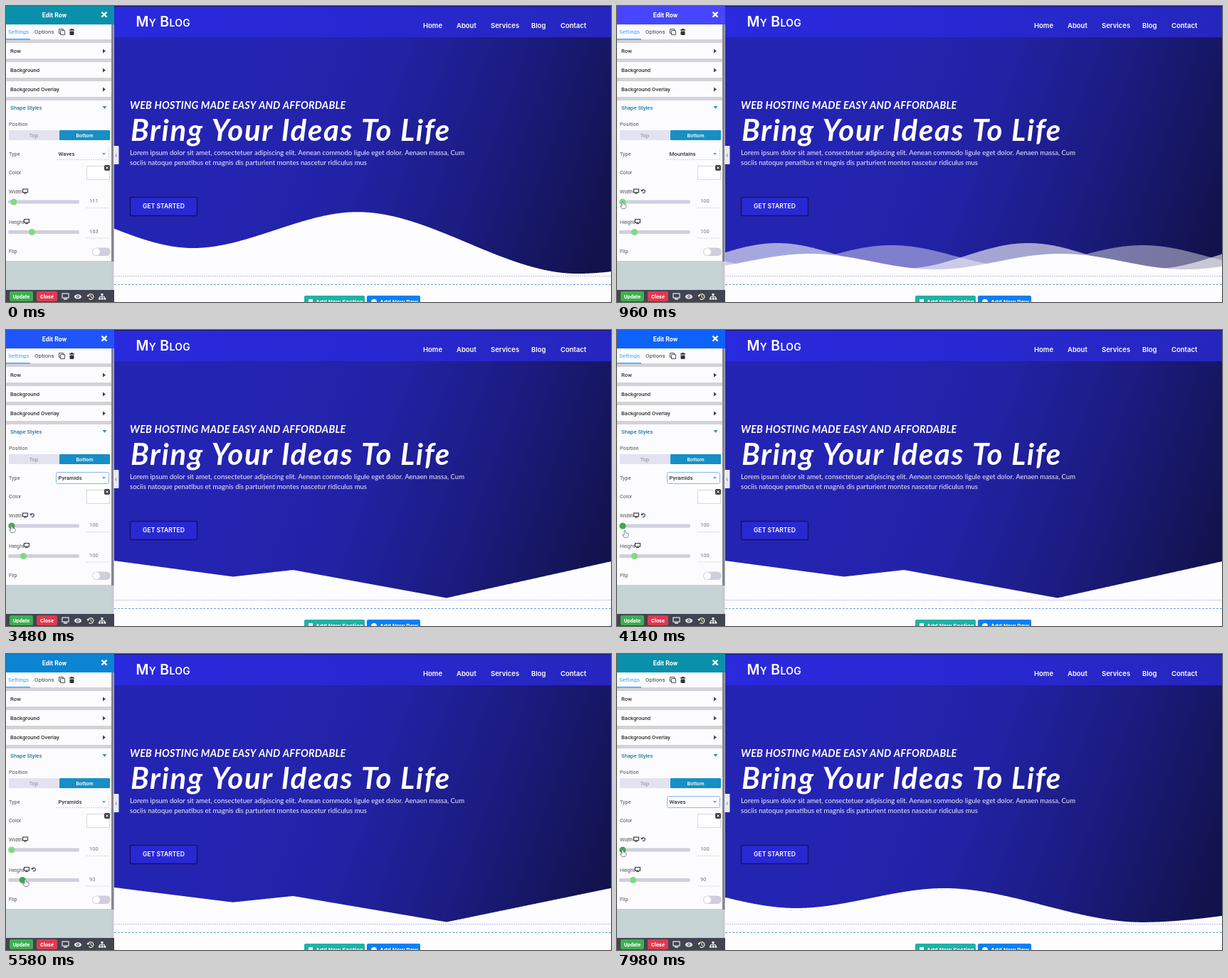
Write an HTML page with a canvas that moves like this. It is 850 px wide and 417 px high and loops after 8000 ms.

```html
<!DOCTYPE html>
<html lang="en">
<head>
<meta charset="utf-8">
<title>Row shape editor</title>
<style>
html, body { margin: 0; width: 850px; height: 417px; overflow: hidden; background: #fff; }
canvas { display: block; }
</style>
</head>
<body>
<canvas id="stage" width="850" height="417"></canvas>
<script>
const ctx = document.getElementById('stage').getContext('2d');
const LOOP = 8000, CUT = 960, BASE = 379, LEFT = 152, WIDTH = 698;
const WHITE = '#fdfdff', INK = '#333a70', LABEL = '7.3px Roboto', HEADING = '500 7.7px Roboto';

const spots = { width: [8, 276], type: [92, 219], height: [27, 318] };
// Cursor trips: start, duration, destination
const trips = [[1500, 800, 'type'], [2950, 500, 'width'], [4000, 550, 'height'],
  [6000, 700, 'type'], [7350, 600, 'width']];

const mix = (a, b, u) => a + (b - a) * u;
function ease(t, start, duration) {
  const u = Math.max(0, Math.min(1, (t - start) / duration));
  return u * u * (3 - 2 * u);
}

function rect(x, y, w, h, color, r = 0) {
  ctx.fillStyle = color;
  ctx.beginPath();
  ctx.roundRect(x, y, w, h, r);
  ctx.fill();
}
function frame(x, y, w, h, color, r = 0, width = 1) {
  ctx.strokeStyle = color;
  ctx.lineWidth = width;
  ctx.beginPath();
  ctx.roundRect(x + .5, y + .5, w - 1, h - 1, r);
  ctx.stroke();
}
function circle(x, y, r, color) {
  ctx.fillStyle = color;
  ctx.beginPath();
  ctx.arc(x, y, r, 0, 7);
  ctx.fill();
}
function arc(x, y, r, from, to, color, width) {
  ctx.strokeStyle = color;
  ctx.lineWidth = width;
  ctx.beginPath();
  ctx.arc(x, y, r, from, to);
  ctx.stroke();
}
function line(points, color, width = 1, dash = []) {
  ctx.strokeStyle = color;
  ctx.lineWidth = width;
  ctx.setLineDash(dash);
  ctx.beginPath();
  points.forEach(([x, y]) => ctx.lineTo(x, y));
  ctx.stroke();
  ctx.setLineDash([]);
}
function poly(points, color) {
  ctx.fillStyle = color;
  ctx.beginPath();
  points.forEach(([x, y]) => ctx.lineTo(x, y));
  ctx.closePath();
  ctx.fill();
}
function cross(x, y, r, width) {
  line([[x - r, y - r], [x + r, y + r]], '#fff', width);
  line([[x + r, y - r], [x - r, y + r]], '#fff', width);
}
function text(s, x, y, font, color, align = 'left', spacing = 0) {
  ctx.font = font + ', sans-serif';
  ctx.letterSpacing = spacing + 'px';
  ctx.textAlign = align;
  ctx.fillStyle = color;
  ctx.fillText(s, x, y);
}
function shade(x0, y0, x1, y1, colors) {
  const g = ctx.createLinearGradient(x0, y0, x1, y1);
  colors.forEach((c, i) => g.addColorStop(i / (colors.length - 1), c));
  return g;
}

// Height profiles: position 0..1 along the row to a fraction of the shape height
function between(points, blend) {
  return x => {
    const i = points.findIndex(p => p[0] >= x);
    const [a, b] = [points[Math.max(0, i - 1)], points[i]];
    return mix(a[1], b[1], blend((x - a[0]) / (b[0] - a[0] || 1)));
  };
}
const wave = between([[-.2, .68], [.143, .233], [.441, .545], [.84, .012], [1.2, .25]], u => ease(u, 0, 1));
const pyramid = between([[0, .54], [.239, .315], [.36, .41], [.669, .015], [1, .53]], u => u);
const ridge = (crest, mean, swing) => x => mean + swing * Math.cos((x - crest) / .505 * 2 * Math.PI);

function fillBelow(profile, height, color, stretch = 1) {
  const points = [[850, 381], [LEFT, 381]];
  for (let x = 0; x <= WIDTH; x++) points.push([LEFT + x, BASE - height * profile(x / WIDTH / stretch)]);
  poly(points, color);
}
function drawShape({ type, height, width }) {
  if (type === 'Waves') fillBelow(wave, height, WHITE, width / 100);
  else if (type === 'Pyramids') fillBelow(pyramid, height, WHITE);
  else {
    fillBelow(ridge(.335, .27, .15), height, 'rgba(255,255,255,.42)');
    fillBelow(ridge(.105, .27, .18), height, 'rgba(255,255,255,.6)');
    fillBelow(ridge(.17, .19, .11), height, WHITE);
  }
}

function drawPage(state) {
  rect(LEFT, 0, WIDTH, 417, WHITE);
  rect(LEFT, 44, WIDTH, 336, shade(330, 110, 850, 300, ['#2424b2', '#2222a6', '#1b1b7e', '#12124c']));
  rect(LEFT, 0, WIDTH, 44, shade(LEFT, 0, 850, 0, ['#2a2ade', '#2828d2', '#2626be']));
  rect(LEFT, 0, WIDTH, 1, '#15156c');
  drawShape(state);

  text('My Blog', 182.5, 29, 'small-caps 600 19.5px Inter', '#fff', 'left', .3);
  [['Home', 586], ['About', 633], ['Services', 681], ['Blog', 738], ['Contact', 779]].forEach(([s, x]) =>
    text(s, x, 31, '600 9.5px Inter', '#fff'));
  text('WEB HOSTING MADE EASY AND AFFORDABLE', 174, 145, 'italic 700 14.4px Lato', '#fff', 'left', .2);
  text('Bring Your Ideas To Life', 175, 190, 'italic 700 42px Lato', '#fff', 'left', 1.65);
  ['Lorem ipsum dolor sit amet, consectetuer adipiscing elit. Aenean commodo ligule eget dolor. Aenaen massa, Cum',
    'sociis natoque penatibus et magnis dis parturient montes nascetur ridiculus mus'].forEach((s, i) =>
    text(s, 174, 210 + 14 * i, '9.54px Lato', '#f0f0ff'));
  rect(174, 269, 95, 27, '#2929d4', 2);
  frame(174, 269, 95, 27, '#14145c', 2, 1.5);
  text('GET STARTED', 221.5, 285, '600 8.6px Inter', '#fff', 'center');

  line([[LEFT, 380.5], [850, 380.5]], '#b9b9ee', 1, [2, 1]);
  line([[LEFT, 392.5], [850, 392.5]], '#6c9fc4', 1, [3, 2]);
  rect(419, 408, 85, 12, '#20b2a6', 2);
  rect(507, 408, 75, 12, '#0a80f5', 2);
  rect(425, 413, 6, 6, '#fff', 1);
  circle(517, 417, 4, '#fff');
  text('Add New Section', 435, 420, '700 8px Inter', '#fff');
  text('Add New Row', 525, 420, '700 8px Inter', '#fff');
}

function monitor(x, y, color, s = 1) {
  ctx.strokeStyle = color;
  ctx.lineWidth = 1.2;
  ctx.strokeRect(x - 3.5 * s, y - 3 * s, 7 * s, 4.6 * s);
  rect(x - 2 * s, y + 2.4 * s, 4 * s, 1.2 * s, color);
}
function resetIcon(x, y) {
  arc(x, y, 2.3, -2.4, 2.2, INK, 1.1);
  poly([[x - 3.2, y - 3], [x - 3.2, y + .3], [x, y - .2]], INK);
}
function drawSlider(label, y, value, knobX, iconX, hovered, held) {
  text(label, 4, y - 12, LABEL, '#555');
  monitor(iconX, y - 15, '#444');
  if (hovered) resetIcon(iconX + 10, y - 15);
  rect(3, y - 2.5, 100, 5, '#cfcfdf', 2);
  circle(knobX, y, 4.5, held ? '#42a84e' : '#7edb7e');
  text(String(Math.round(value)), 117, y + 1, '7.6px Roboto', '#777');
  line([[113, y + 8.5], [145, y + 8.5]], '#d5d5d3', 1, [2, 1]);
}

function drawToolbar() {
  rect(0, 400, 152, 17, '#414451');
  rect(5, 402, 33, 14, '#3fae51', 2);
  rect(43, 402, 29, 14, '#de3b52', 2);
  text('Update', 21.5, 411.5, '700 7.4px Roboto', '#fff', 'center');
  text('Close', 57.5, 411.5, '700 7.4px Roboto', '#fff', 'center');
  monitor(83.5, 409, '#eee', 1.3);
  ctx.fillStyle = '#eee';
  ctx.beginPath();
  ctx.ellipse(101, 409.5, 5, 3.2, 0, 0, 7);
  ctx.fill();
  circle(101, 409.5, 2, '#414451');
  circle(101, 409.5, 1, '#eee');
  arc(119, 409.5, 3.8, -2.8, 2.3, '#eee6c4', 1.3);
  poly([[113.5, 407], [117.5, 407], [115, 410.5]], '#eee6c4');
  line([[119, 407], [119, 410], [121, 411]], '#eee6c4');
  rect(133.5, 405, 3, 3, '#eee');
  line([[135, 408], [135, 412]], '#eee');
  line([[131.5, 412], [131.5, 409.5], [138.5, 409.5], [138.5, 412]], '#eee');
  [130, 133.7, 137.4].forEach(x => rect(x, 411, 2.8, 2.8, '#eee'));
}

function drawPanel(state) {
  rect(0, 0, 152, 417, '#fcfcff');
  text('Settings', 3, 39, '8px Roboto', '#42a5f0');
  text('Options', 40, 39, '8px Roboto', '#444');
  frame(74, 32, 7, 7, '#555');
  rect(76, 34, 7, 7, '#fcfcff');
  frame(76, 34, 7, 7, '#555');
  rect(89, 33, 7, 1.5, '#333');
  rect(91, 32, 3, 1, '#333');
  rect(89.5, 35.5, 6, 5.5, '#333', 1);

  for (let i = 0; i < 4; i++) rect(0, 47 + 27 * i, 148, 5, '#d2d2d8');
  rect(0, 46, 34, 1.5, '#42a5f0');
  ['Row', 'Background', 'Background Overlay'].forEach((s, i) => {
    const y = 66 + 27 * i;
    text(s, 6, y, HEADING, '#333');
    poly([[136, y - 5.5], [136, y + .5], [140, y - 2.5]], '#39445c');
  });
  text('Shape Styles', 6, 146, HEADING, '#2678a8');
  poly([[135.5, 141], [141.5, 141], [138.5, 145]], '#2b91c4');

  [['Position', 169], ['Type', 211], ['Color', 237], ['Flip', 348]].forEach(([s, y]) =>
    text(s, 4, y, LABEL, '#555'));
  rect(4, 175, 71, 14, '#e2e2f0', 1);
  rect(75, 175, 71, 14, '#168fc6', 1);
  text('Top', 39, 184.5, LABEL, '#888', 'center');
  text('Bottom', 110.5, 184.5, '500 7.3px Roboto', '#fff', 'center');

  if (state.focus) frame(70, 200, 75, 17, '#8cb8ea', 2);
  else line([[71, 216.5], [144.5, 216.5], [144.5, 200]], '#d0d0e2', 1, [2, 1]);
  text(state.type, 73.5, 211, '500 7.8px Roboto', '#333');
  poly([[135, 207], [140, 207], [137.5, 210]], '#4ba3d8');
  if (state.hover === 'type') resetIcon(23, 209);

  rect(113, 225, 33, 19, '#fff');
  frame(113, 225, 33, 20, '#d9d8d0');
  rect(138, 224, 8, 8, '#444', 2);
  cross(142, 228, 1.5, 1);

  const onWidth = state.hover === 'width', onHeight = state.hover === 'height';
  drawSlider('Width', 276, state.width, 8 + .27 * (state.width - 100), 27, onWidth, onWidth && state.focus);
  drawSlider('Height', 318.5, state.height, 5.5 + .19 * state.height, 29, onHeight, onHeight);
  rect(121, 340.5, 26, 11.5, '#cfcfdc', 6);
  circle(127, 346.2, 5, '#fff');

  rect(0, 359, 148, 41, '#c6d3d5');
  rect(148, 26, 3.5, 374, '#c9c9d2');
  rect(148, 26, 3.5, 334, '#85858f');
  rect(0, 0, 152, 26, state.header);
  text('Edit Row', 68, 16, '700 8.8px Roboto', '#fff', 'center');
  cross(138, 12, 3.5, 2.4);
  drawToolbar();
  rect(151, 197, 7.5, 26, '#e9e9f4', 1);
  line([[155.5, 208.5], [153.8, 210.5], [155.5, 212.5]], '#555', .8);
}

function drawCursor([x, y], hand) {
  const outline = (hand
    ? [[-1, 0], [1, 0], [1, 3], [5, 4], [5, 7], [3.5, 9.5], [-1, 9.5], [-3.5, 5.5], [-1, 6]]
    : [[0, 0], [0, 7], [1.8, 5.6], [3, 8], [4.2, 7.4], [3, 5], [5, 5]]).map(([dx, dy]) => [x + dx, y + dy]);
  poly(outline, '#fff');
  line([...outline, outline[0]], '#70708c', .8);
}

function stateAt(t) {
  const intro = t < CUT;
  const height = intro ? 163 : 100 + 9 * ease(t, 4600, 260) - 19 * ease(t, 4900, 900);
  const cursor = trips.reduce(([x, y], [start, duration, name]) => {
    const u = ease(t, start, duration);
    return [mix(x, spots[name][0], u), mix(y, spots[name][1], u)];
  }, spots.width);
  const near = Object.keys(spots).find(name => Math.abs(cursor[1] - spots[name][1]) < 14);
  const fade = intro ? 1 : ease(t, CUT, LOOP - CUT);
  return {
    cursor, height, intro,
    hover: intro ? '' : near,
    header: `hsl(${mix(240, 190, fade)} ${mix(100, 88, fade)}% ${mix(63.7, 35.7, fade)}%)`,
    type: intro || t >= 7350 ? 'Waves' : t < 2950 ? 'Mountains' : 'Pyramids',
    width: intro ? 111 : 100,
    focus: t > 2200 && t < 4300 || t > 6650
  };
}

function render(now) {
  const state = stateAt(now % LOOP);
  drawPage(state);
  drawPanel(state);
  if (!state.intro) drawCursor(state.cursor, state.hover !== 'type');
  requestAnimationFrame(render);
}
requestAnimationFrame(render);
</script>
</body>
</html>
```
